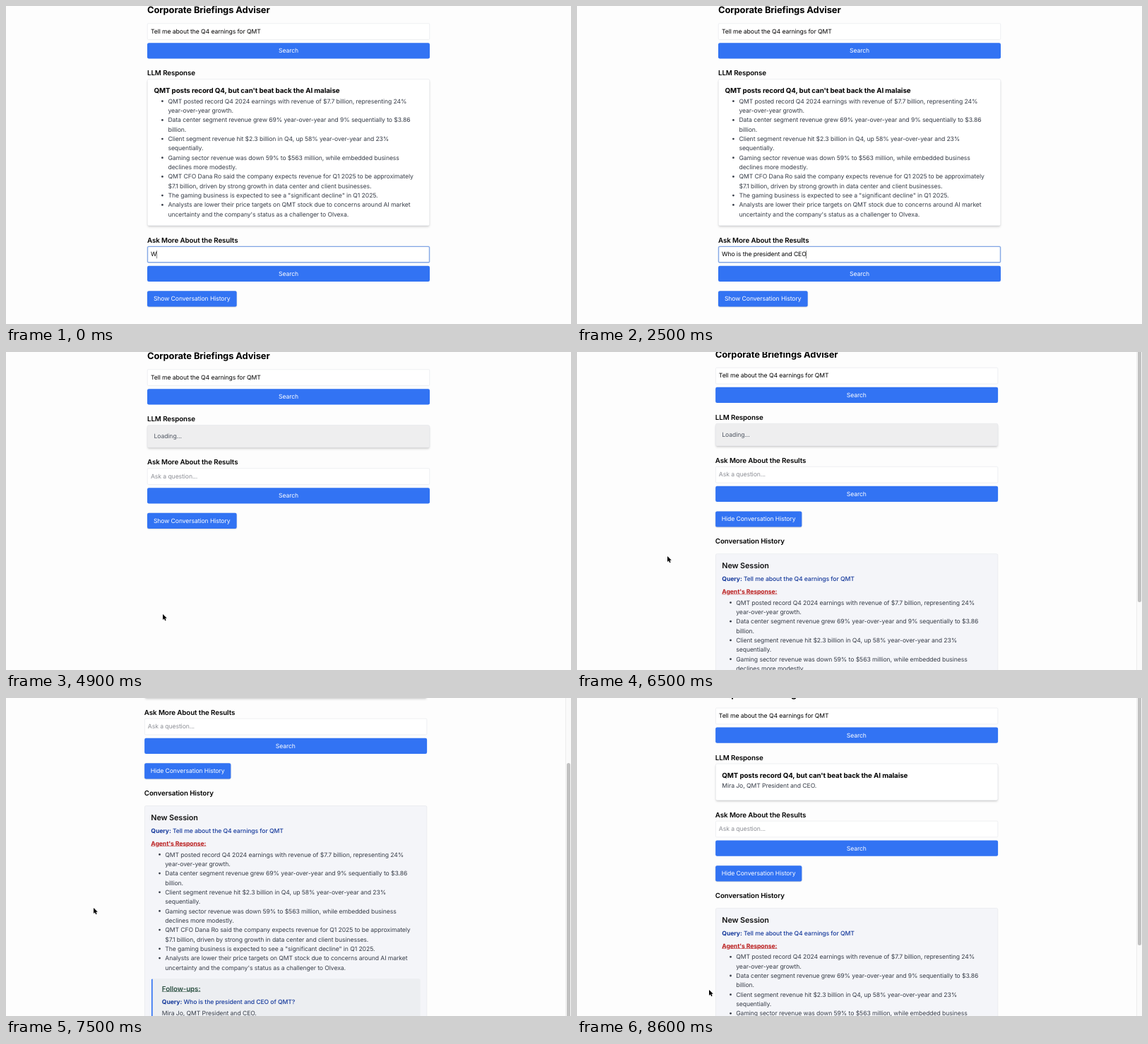
These frames come from a looping animation (800x450 px, 9600 ms). An HTML page:

```html
<!DOCTYPE html>
<html lang="en">
<head>
<meta charset="utf-8">
<title>Corporate Briefings Adviser</title>
<style>
  * { box-sizing: border-box; margin: 0; padding: 0; }
  html, body { width: 100%; height: 100%; overflow: hidden; background: #fdfdfd; }
  #stage { position: relative; width: 800px; height: 450px; overflow: hidden; }
  #page {
    position: absolute; width: 1440px; transform-origin: 0 0;
    font: 15.5px/24px Inter, sans-serif; letter-spacing: -.009em;
    text-rendering: geometricPrecision; white-space: nowrap; color: #000;
  }
  main { width: 720px; margin: -6px auto 0; }
  h1 { font-size: 23.2px; line-height: 32px; margin-bottom: 18px; }
  h2, h3 { font-size: 17.55px; line-height: 28px; font-weight: 600; }
  h2 { margin-top: 24px; }
  .field { height: 42px; padding: 8px; background: #fff; border: 1px solid #e3e4e8; border-radius: 3px; }
  .field.focus { border-color: #2060d0; box-shadow: inset 0 0 0 1px #2060d0; }
  .caret { display: inline-block; width: 1px; height: 20px; background: #222; vertical-align: -5px; }
  .hint { color: #8c8e95; }
  .button { height: 40px; padding: 8px 16px; margin-top: 8px; text-align: center; color: #fff; background: #3273f3; border-radius: 4px; }
  .toggle { width: fit-content; margin-top: 24px; box-shadow: 0 1px 3px #0003; }
  .card { padding: 16px; color: #373d48; background: #fff; border: 1px solid #e3e4e8; border-radius: 4px; box-shadow: 0 4px 6px -1px #0002, 0 2px 4px -2px #0003; }
  .card h3 { color: #000; font-weight: 700; }
  .card.loading { background: #eeeeef; color: #4f5662; }
  ul { padding-left: 36px; }
  .session { margin-top: 16px; padding: 16px; color: #373d48; background: #f4f5f9; border: 1px solid #e3e4e8; border-radius: 4px; }
  .session h3 { font-size: 19.4px; color: #111; }
  .query { margin-top: 8px; font-weight: 500; color: #163a9c; }
  .agent { margin: 8px 0 4px; font-weight: 700; color: #b91c1c; text-decoration: underline; }
  .follow { margin-top: 16px; padding: 12px 24px; background: #eceef1; border-left: 4px solid #3273f3; border-radius: 4px; }
  .follow h3 { font-size: 17.55px; color: #2a4f40; text-decoration: underline; }
  .answer { margin-top: 4px; }
  #bar { position: absolute; left: 791.5px; top: 0; width: 8.5px; height: 450px; background: #fafafa; border-left: 1px solid #ececec; }
  #thumb { position: absolute; left: 1.7px; width: 4.4px; border-radius: 3px; background: #c1c1c1; }
  #pointer { position: absolute; left: -1px; top: -1px; }
  [hidden] { display: none !important; }
</style>
</head>
<body>
<div id="stage">
  <div id="page"><main>
    <h1>Corporate Briefings Adviser</h1>
    <div class="field">Tell me about the Q4 earnings for QMT</div>
    <div class="button">Search</div>
    <h2>LLM Response</h2>
    <div id="card" class="card"></div>
    <h2>Ask More About the Results</h2>
    <div id="ask" class="field"></div>
    <div class="button">Search</div>
    <div id="toggle" class="button toggle"></div>
    <section id="history">
      <h2>Conversation History</h2>
      <div class="session">
        <h3>New Session</h3>
        <p class="query"><b>Query:</b> Tell me about the Q4 earnings for QMT</p>
        <p class="agent">Agent's Response:</p>
        <ul id="summary"></ul>
        <div class="follow">
          <h3>Follow-ups:</h3>
          <p class="query"><b>Query:</b> Who is the president and CEO of QMT?</p>
          <p id="answer" class="answer"></p>
        </div>
      </div>
    </section>
  </main></div>
  <div id="bar"><div id="thumb"></div></div>
  <svg id="pointer" width="9" height="13" viewBox="-1 -1 9 13">
    <path d="M0 0V8L1.9 6.3L3.2 9.2L4.6 8.6L3.3 5.8H5.8Z" fill="#000" stroke="#fff" stroke-width=".8" paint-order="stroke"/>
  </svg>
</div>
<script>
const el = id => document.getElementById(id);
const LOOP = 9600, STEP = 100, SUBMIT = 4500, EXPAND = 5900, ANSWERED = 7200;
const QUESTION = 'Who is the president and CEO of QMT?';
const ANSWER = 'Mira Jo, QMT President and CEO.';
const HEADLINE = '<h3>QMT posts record Q4, but can\'t beat back the AI malaise</h3>';
const BULLETS = [
  'QMT posted record Q4 2024 earnings with revenue of $7.7 billion, representing 24%<br>year-over-year growth.',
  'Data center segment revenue grew 69% year-over-year and 9% sequentially to $3.86<br>billion.',
  'Client segment revenue hit $2.3 billion in Q4, up 58% year-over-year and 23%<br>sequentially.',
  'Gaming sector revenue was down 59% to $563 million, while embedded business<br>declines more modestly.',
  'QMT CFO Dana Ro said the company expects revenue for Q1 2025 to be approximately<br>$7.1 billion, driven by strong growth in data center and client businesses.',
  'The gaming business is expected to see a "significant decline" in Q1 2025.',
  'Analysts are lower their price targets on QMT stock due to concerns around AI market<br>uncertainty and the company\'s status as a challenger to Olvexa.'
].map(text => `<li>${text}</li>`).join('');

// Keyframes: [time, value, ...]
const TYPED = [[0, 1], [700, 10], [800, 10], [1100, 15], [1300, 15], [2100, 24], [2200, 24], [2500, 28], [3100, 34], [3300, 34], [3500, 36]];
const SCROLL = [[6400, 0], [6500, 2.4], [6800, 123.5], [7000, 140], [7300, 143], [7400, 143], [7500, 135.5], [7700, 85], [8000, 30], [8300, 0], [8600, -9.4]];
const POINTER = [[3700, 160, 355], [4400, 218, 375], [4600, 218, 375], [4900, 222, 371], [5100, 222, 376], [5700, 240, 240], [5900, 240, 240], [6500, 128, 289], [6800, 125, 293], [7500, 124, 297], [7800, 124, 297], [8400, 187, 413]];
// The longer answer card pushes the scrolled content down by this much.
const ANCHOR = 20;

function track(keys, time) {
  const next = keys.findIndex(key => key[0] > time);
  if (next < 1) return (next ? keys[keys.length - 1] : keys[0]).slice(1);
  const a = keys[next - 1], b = keys[next], k = (time - a[0]) / (b[0] - a[0]);
  return a.slice(1).map((v, i) => v + (b[i + 1] - v) * k);
}

function setHtml(node, html) {
  if (node.shown !== html) node.innerHTML = node.shown = html;
}

function render(time) {
  const typing = time < SUBMIT, expanded = time >= EXPAND, answered = time >= ANSWERED;
  const loading = !typing && !answered;

  el('card').classList.toggle('loading', loading);
  setHtml(el('card'), loading ? 'Loading...'
    : HEADLINE + (answered ? `<p style="margin-bottom:8px">${ANSWER}</p>` : `<ul>${BULLETS}</ul>`));

  el('ask').classList.toggle('focus', typing);
  const count = Math.round(track(TYPED, time)[0]);
  setHtml(el('ask'), typing ? QUESTION.slice(0, count) + '<i class="caret"></i>'
    : '<span class="hint">Ask a question...</span>');

  setHtml(el('toggle'), (expanded ? 'Hide' : 'Show') + ' Conversation History');
  setHtml(el('answer'), answered ? ANSWER : 'Loading...');
  el('history').hidden = el('bar').hidden = !expanded;

  const scroll = track(SCROLL, time)[0] + (answered ? ANCHOR : 0), ratio = answered ? .75 : .77;
  el('page').style.width = (expanded ? 1425 : 1440) + 'px';
  el('page').style.transform = `translateY(${-scroll}px) scale(${5 / 9})`;
  el('thumb').style.top = -25 + scroll * ratio + 'px';
  el('thumb').style.height = 490 * ratio + 'px';

  const [x, y] = track(POINTER, time);
  el('pointer').style.display = time < POINTER[0][0] ? 'none' : '';
  el('pointer').style.transform = `translate(${x}px, ${y}px)`;
}

setHtml(el('summary'), BULLETS);
const start = performance.now();
(function tick() {
  const time = (performance.now() - start) % LOOP;
  render(Math.floor(time / STEP) * STEP);
  requestAnimationFrame(tick);
})();
</script>
</body>
</html>
```
